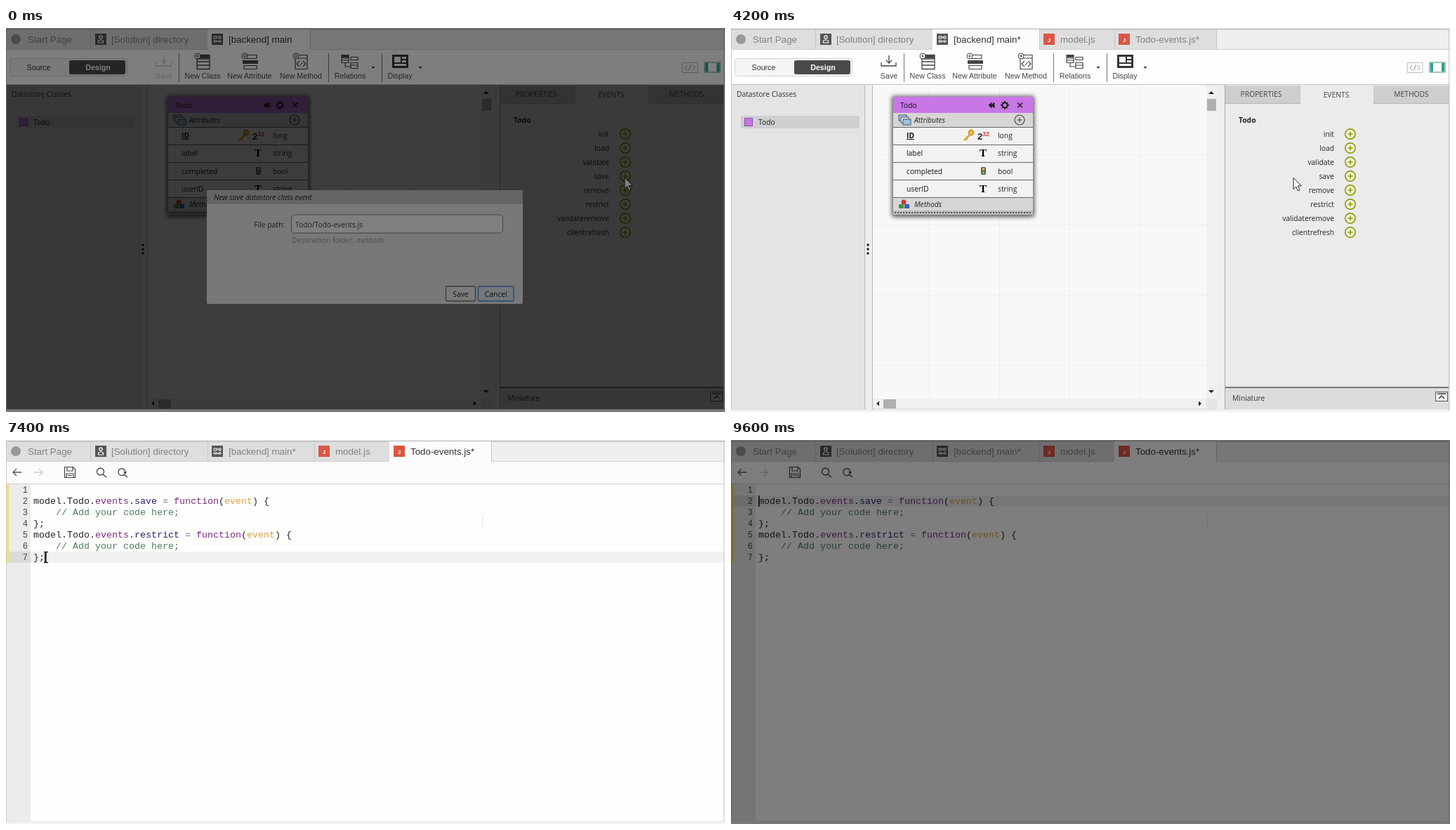
Animation of 1024 by 547 pixels, one loop 9.8 s. Source, as an HTML page:

```html
<!DOCTYPE html>
<html lang="en">
<head>
<meta charset="utf-8">
<title>Datastore class events</title>
<style>
html, body { margin: 0; width: 100%; height: 100%; overflow: hidden; background: #fff; }
svg { display: block; width: 100%; height: 100%; }
text { white-space: pre; }
.ui { font: 13.33px "Liberation Sans", Arial, sans-serif; }
.tool { font: 10.67px "Liberation Sans", Arial, sans-serif; }
.panel { font: 10.3px "Open Sans", "Noto Sans", sans-serif; }
.code { font: 13.33px "Liberation Mono", monospace; }
.italic { font-style: italic; }
.bold { font-weight: bold; }
</style>
</head>
<body>
<svg id="stage" viewBox="0 0 1024 547" preserveAspectRatio="none"></svg>
<script>
const LOOP = 9800, STEP = 200;
const stage = document.getElementById('stage');

const rect = (x, y, w, h, fill, extra = '') =>
  `<rect x="${x}" y="${y}" width="${w}" height="${h}" fill="${fill}" ${extra}/>`;
const path = (d, stroke = '#444', width = 1, fill = 'none', extra = '') =>
  `<path d="${d}" stroke="${stroke}" stroke-width="${width}" fill="${fill}" ${extra}/>`;
const text = (cls, x, y, str, fill = '#333', extra = '') =>
  `<text class="${cls}" x="${x}" y="${y}" fill="${fill}" ${extra}>${str}</text>`;
const circle = (x, y, r, fill, stroke = 'none', width = 1) =>
  `<circle cx="${x}" cy="${y}" r="${r}" fill="${fill}" stroke="${stroke}" stroke-width="${width}"/>`;
const group = (body, extra = '') => `<g ${extra}>${body}</g>`;
const plus = (x, y, r, color, fill = 'none', width = 1.5) =>
  circle(x, y, r, fill, color, width) +
  path(`M${x - r / 2} ${y}h${r}M${x} ${y - r / 2}v${r}`, color, width);

const MIDDLE = 'text-anchor="middle"', END = 'text-anchor="end"';
const PURPLE = '#c878e6';

// Timeline: [time, x, y, shape], eased from one row to the next
const CURSOR = [
  [0, 881, 213, 'arrow'], [600, 881, 213, 'arrow'], [1200, 651, 378, 'hand'],
  [1600, 655, 377, 'arrow'], [1800, 655, 377, 'beam'], [2100, 655, 377, 'beam'],
  [3100, 353, 16, 'arrow'], [3600, 353, 16, 'arrow'], [4400, 884, 250, 'arrow'],
  [5200, 884, 250, 'arrow'], [5800, 645, 377, 'hand'], [6000, 645, 377, 'arrow'],
  [6200, 645, 377, 'beam'], [6600, 645, 377, 'beam'], [7200, 57, 167, 'beam'],
  [7400, 57, 167, 'beam'], [7800, 40, 87, 'beam'], [8200, 281, 154, 'arrow'],
];
const SCENES = [
  { from: 0, view: 'design', dialog: 'save', tabs: 3, fade: .5 },
  { from: 200, view: 'design', dialog: 'save', tabs: 3 },
  { from: 1400, view: 'design', dialog: 'save', tabs: 3, idle: true },
  { from: 1600, view: 'design', tabs: 3, idle: true },
  { from: 1800, view: 'editor', lines: 4, line: 4 },
  { from: 3200, view: 'design' },
  { from: 4800, view: 'design', dialog: 'restrict' },
  { from: 6000, view: 'design' },
  { from: 6200, view: 'editor', lines: 4, line: 4, gutter: 491 },
  { from: 6400, view: 'editor', lines: 7, line: 7 },
  { from: 7600, view: 'editor', lines: 7, line: 5, selected: true },
  { from: 7800, view: 'editor', lines: 7, line: 2, selected: true },
  { from: 9400, view: 'editor', lines: 7, line: 2, noCursor: true },
  { from: 9600, view: 'editor', lines: 7, line: 2, noCursor: true, fade: .5 },
];

function tabBar(scene) {
  const design = scene.view === 'design', short = scene.tabs === 3;
  const edges = short ? [0, 120, 287, 433] : [0, 120, 287, 439, 546, 691];
  const active = design ? 2 : 4;
  const last = edges[edges.length - 1];
  let out = rect(0, 0, 1024, 31, '#efefef') + rect(0, 2, last, 28, '#dedede') +
    rect(0, 1, 1024, 1.5, '#bcbcbc') + rect(0, 30, 1024, 1, '#cfcfcf');
  edges.slice(1).forEach(x => out += rect(x, 3, 1, 27, '#c6c6c6'));
  out += rect(edges[active], 2, edges[active + 1] - edges[active], 29, '#fcfcfc');
  const label = (i, x, str) => text('ui', x, 21, str, i === active ? '#333' : '#808080');
  out += circle(14, 16, 7, '#999') + label(0, 31, 'Start Page');
  out += rect(127, 8, 16, 16, '#555') + circle(135, 13, 2.2, 'none', '#fff', 1.2) +
    path('M131.5 21v-2q0-2 3.5-2t3.5 2v2z', '#fff', 1.2) + label(1, 150, '[Solution] directory');
  out += rect(293, 8, 16, 16, '#555') +
    path('M296 12h4v3h-4zM296 18h4v2h-4zM303 12h3v3h-3zM303 18h3v2h-3zM300 13h3M300 19h3', '#fff') +
    label(2, 317, short ? '[backend] main' : '[backend] main*');
  if (short) return out;
  [[445, 469, 'model.js'], [552, 576, 'Todo-events.js*']].forEach(([x, tx, str], i) => {
    out += rect(x, 8, 16, 16, '#dc5545') +
      text('tool bold', x + 8, 19.5, 'J', '#fff', MIDDLE + ' style="font-size:8px"') + label(3 + i, tx, str);
  });
  return out;
}

function designToolbar(scene) {
  const dim = off => off ? 'opacity=".28"' : '';
  const badge = x => plus(x - 7, 40, 4, '#444', '#fff', 1);
  const item = (x, str, icon, off) =>
    group(icon + text('tool', x, 72, str, '#444', MIDDLE), dim(off));
  const saveOff = scene.tabs === 3, itemOff = scene.idle;
  let out = rect(0, 31, 1024, 50, '#fefefe');
  out += rect(5.5, 43.5, 167, 25, '#f5f5f5', 'rx="3" stroke="#d5d5d5"') +
    rect(90, 46, 80, 20, '#4a4a4a', 'rx="3"') +
    text('tool', 46.5, 60, 'Source', '#333', MIDDLE) + text('tool bold', 131, 60, 'Design', '#fff', MIDDLE);
  [246, 459, 535].forEach(x => out += rect(x, 36, 1, 41, '#777'));
  out += item(225, 'Save', path('M214 49v5h21v-5M225 39v10M221 46l4 4 4-4', '#444', 1.3), saveOff);
  out += item(280, 'New Class', path('M272 38.5h18v20h-18zM272 44h18M272 48h18M272 53h18', '#444', 1.3) +
    rect(272, 38, 18, 5, '#444') + badge(280));
  out += item(347, 'New Attribute', path('M339 38.5h18v5h-18zM339 53.5h18v5h-18z', '#444', 1.2) +
    rect(337, 46, 22, 5, '#444') + badge(347), itemOff);
  out += item(420, 'New Method', path('M412 38.5h17v20h-17zM412 43h17M418 47l-4 4 4 4M423 47l4 4-4 4M422 49l-3 4', '#444', 1.2) +
    badge(420), itemOff);
  out += item(490, 'Relations', path('M478 38.5h10v11h-10zM478 43h10M478 46h10M491 41.5h10v4h-10zM491 49.5h10v8h-10zM491 53h10M483 50v5h8', '#444', 1.2) +
    rect(478, 38, 10, 4, '#444'));
  out += item(561, 'Display', rect(550, 38, 23, 19, '#333') +
    rect(553, 41, 9, 8, '#fff') + rect(564, 41, 6, 3, '#fff') + rect(564, 46, 6, 3, '#fff') + rect(553, 51, 17, 3, '#fff'));
  [523, 590].forEach(x => out += path(`M${x - 2.5} 55h5l-2.5 3z`, 'none', 0, '#333'));
  out += path('M963 49.5h22v14h-22z', '#bbb') + path('M970 53l-3 3.5 3 3.5M978 53l3 3.5-3 3.5M975.5 52l-3 9', '#888') +
    rect(995, 49, 22, 14, '#fff', 'stroke="#3f8f7d"') + rect(996, 50, 4, 12, '#2fa58a') + rect(1012, 50, 4, 12, '#2fa58a');
  return out + rect(0, 80, 1024, 1, '#c4c4c4');
}

function classBox() {
  let out = rect(229, 97, 203, 172, '#000', 'opacity=".65" filter="url(#blur)" rx="3"') +
    rect(231, 98, 199, 168, '#f2f2f2') + rect(231, 98, 199, 23, PURPLE) + rect(231, 121, 199, 20, '#d6d6d6') +
    rect(231, 241, 199, 19, '#d6d6d6') + rect(231, 260, 199, 6, '#bbb');
  out += path('M233 263h195', '#555', 2, 'none', 'stroke-dasharray="2 2"');
  [141, 166, 191, 216, 241].forEach(y => out += rect(231, y, 199, 1, '#666'));
  out += text('panel', 241, 114, 'Todo', '#111') + path('M371 106l-4 4 4 4zM375 106l-4 4 4 4z', '#222', 1, '#222') +
    circle(390, 110, 3.5, 'none', '#222', 2) +
    path('M390 104v2M390 114v2M384 110h2M394 110h2M386 106l1 1M393 113l1 1M386 114l1-1M393 107l1-1', '#222', 2) +
    path('M408 106.5l7 7M415 106.5l-7 7', '#222', 1.6);
  out += rect(239, 124, 11, 8, '#a9c7dc', 'stroke="#456"') + rect(242, 127, 11, 8, '#d8e8f2', 'stroke="#456"') +
    rect(245, 130, 11, 8, '#9fc4df', 'stroke="#456"') +
    text('panel italic', 261, 134.5, 'Attributes', '#222') + plus(411, 131, 7, '#444', 'none', 1.2);
  [['ID', 'long'], ['label', 'string'], ['completed', 'bool'], ['userID', 'string']].forEach(([name, type], i) => {
    const y = 157 + i * 25.3;
    out += text(i ? 'panel' : 'panel bold', 250, y, name, '#111', i ? '' : 'text-decoration="underline"') +
      text('panel', 380, y, type, '#222');
    if (i % 2) out += `<text x="359" y="${y + 1}" text-anchor="middle" font-family="Liberation Serif, serif" font-size="15" font-weight="bold">T</text>`;
  });
  out += path('M340 152l-8 8M335 157l2 2', '#e0a52a', 2.5) + circle(342, 149, 3.5, '#f0c550', '#c9932a', 1.8) +
    text('tool bold', 351, 159, '2', '#222', 'style="font-size:13px"') +
    text('tool bold', 358, 154, '32', '#d0453a', 'style="font-size:9px"');
  out += rect(356, 198, 7, 11, '#555', 'rx="2"') + circle(359.5, 201, 2, '#e2b44a') + circle(359.5, 206, 2, '#7ec04a');
  out += circle(246, 248, 3.5, '#c23d35') + rect(239, 251, 7, 6, '#42953f') + rect(247, 251, 7, 6, '#3d62a8') +
    text('panel italic', 261, 255, 'Methods', '#222');
  return out;
}

function designBody() {
  let out = rect(0, 81, 1024, 462, '#e4e4e4') + rect(190, 81, 11, 462, '#eee') + rect(201, 81, 476, 447, '#f8f8f8') +
    rect(190, 81, 1, 462, '#bbb') + rect(201, 81, 1, 462, '#bbb');
  [180, 280, 380, 480].forEach(y => out += rect(202, y, 474, 1, '#eee'));
  [282, 382, 482, 582].forEach(x => out += rect(x, 82, 1, 446, '#eee'));
  out += text('panel', 8, 98, 'Datastore Classes') + rect(14, 125, 169, 18, '#cfcfcf') +
    rect(19.5, 128.5, 11, 11, PURPLE, 'stroke="#8d4ba8"') + text('panel', 39, 138, 'Todo', '#222');
  [309, 315, 321].forEach(y => out += circle(195, y, 1.8, '#222'));
  out += rect(677, 82, 15, 446, '#f0f0f0') + rect(202, 528, 475, 14, '#f0f0f0') +
    rect(678, 101, 13, 17, '#b0b0b0') + rect(217, 529, 18, 13, '#b0b0b0') +
    path('M680 94h8l-4-4zM680 516h8l-4 4zM211 531.5v7l-4-3.5zM666 531.5v7l4-3.5z', 'none', 0, '#222');
  out += rect(692, 81, 12, 462, '#eee') + rect(703, 81, 1, 462, '#aaa') + rect(704, 81, 319, 462, '#ebebeb') +
    rect(704, 82, 107, 26, '#cecece') + rect(915, 82, 108, 26, '#cecece') + rect(704, 107, 107, 1, '#b5b5b5') + rect(915, 107, 108, 1, '#b5b5b5');
  [[755, 98, 'PROPERTIES'], [862, 99, 'EVENTS'], [969, 98, 'METHODS']].forEach(([x, y, str]) =>
    out += text('panel', x, y, str, '#444', MIDDLE));
  out += text('panel bold', 723, 135, 'Todo', '#222');
  ['init', 'load', 'validate', 'save', 'remove', 'restrict', 'validateremove', 'clientrefresh'].forEach((name, i) =>
    out += text('panel', 859, 154.5 + i * 20, name, '#222', END) + plus(882, 151 + i * 20, 7.2, '#8d9c12', '#f3f5da', 1.7));
  out += rect(704, 511, 319, 2, '#777') + rect(704, 513, 319, 30, '#dcdcdc') + text('panel', 714, 531, 'Miniature') +
    rect(1003.5, 518.5, 17, 13, '#eee', 'stroke="#555"') + path('M1006 521h12M1008 528l4-4 4 4', '#333', 1.3);
  return out + classBox();
}

function dialog(event, hot) {
  const button = (x, w, str, stroke, fill) =>
    rect(x + .5, 368, w, 21, fill, `rx="2" stroke="${stroke}" stroke-width="1.3"`) +
    text('panel', x + w / 2 + .5, 382.5, str, '#222', MIDDLE);
  return rect(0, 81, 1023, 462, '#000', 'opacity=".5"') +
    rect(286, 231, 450, 162, '#f1f1f3', 'rx="2"') + rect(286, 231, 450, 20, '#cacaca', 'rx="2"') +
    text('panel italic', 296, 245, `New ${event} datastore class event`, '#222') +
    text('panel', 397, 283.5, 'File path:', '#333', END) +
    rect(406.5, 266, 301, 26, '#fff', 'rx="5" stroke="#888"') + text('panel', 412, 283.5, 'Todo/Todo-events.js', '#444') +
    text('panel', 407, 306, 'Destination folder: <tspan class="italic">methods</tspan>', '#999') +
    button(626, 42, 'Save', hot ? '#5b8fb8' : '#777', hot ? '#e3eef7' : '#f5f5f5') +
    button(672, 50.5, 'Cancel', '#4a8fd8', '#e6f0f9');
}

const span = (str, fill) => `<tspan fill="${fill}">${str}</tspan>`;
const opening = name => 'model.Todo.' + span('events', '#7b2a80') + '.' + span(name, '#22226e') + ' ' +
  span('=', '#687687') + ' ' + span('function', '#7b2a80') + '(' + span('event', '#e2a045') + ') {';
const comment = '    ' + span('// Add your code here;', '#4b7f5c');
const CODE = ['', opening('save'), comment, '};', opening('restrict'), comment, '};'];

function editor({ lines, line, selected, gutter = 543 }) {
  const top = n => 63 + (n - 1) * 16;
  let out = rect(0, 31, 1024, 32, '#fbfbfc') + rect(0, 62, 1024, 1, '#d2d2d2') +
    rect(0, 63, 1024, 481, '#fefefd') + rect(0, 63, 35, gutter - 63, '#ececec');
  out += path('M22 46H10M15 41l-5 5 5 5', '#555', 1.3) + path('M40 46h12M47 41l5 5-5 5', '#ccc', 1.3) +
    path('M83.5 38.5h12l3 3v12h-15zM87 39v5h8v-5M86 54v-6h10v6M88 50.5h6', '#444', 1.2) +
    circle(134.5, 45, 5, 'none', '#444', 1.3) + path('M138 49l5 4', '#444', 1.5) +
    path('M169 48.5a5 5 0 1 1 .8-4M168 49l5 4', '#444', 1.3) + path('M167 45h5l-2 4z', 'none', 0, '#444');
  out += rect(0, top(line), 35, 16, '#dadada');
  out += selected
    ? rect(39, top(line), 984, (lines - line) * 16, '#b5d5ff') + rect(39, top(lines), 16, 16, '#b5d5ff')
    : rect(35, top(line), 988, 16, '#f0f0f3');
  out += rect(1, 63, 3, lines * 16, '#f4e36a') + rect(678, 107, 1, 20, '#e6e6e6');
  CODE.slice(0, lines).forEach((str, i) => out +=
    text('code', 31, top(i + 1) + 12, i + 1, '#444', END + ' style="font-size:12px"') +
    text('code', 39, top(i + 1) + 12, str, '#222', 'xml:space="preserve"'));
  return out + rect(line === lines ? 55 : 39, top(line), 1.6, 16, '#111');
}

const SHAPES = {
  arrow: path('M0 0v16l3.7-3.5 2.7 6 2.6-1.2-2.7-5.8h5z', '#222', 1, '#fff'),
  hand: path('M-2.500 2q2-2.500 4 0v7l8 2q2.500.7 2.300 3.500l-1.800 9h-9.500l-6-8q-1.500-3 1.200-2.500l1.800 2z', '#222', 1.300, '#fff') +
    path('M4.500 10v3.500M8 11v3', '#222'),
  beam: path('M-3-7.5h2l1 1 1-1h2M-3 7.5h2l1-1 1 1h2M0-7v14', '#222', 1.4),
};

function cursorAt(t) {
  const i = CURSOR.findLastIndex(k => k[0] <= t);
  const [t0, x0, y0, shape] = CURSOR[i], [t1, x1, y1] = CURSOR[i + 1] || [LOOP, x0, y0];
  const u = (t - t0) / (t1 - t0), e = u * u * (3 - 2 * u);
  return { x: x0 + (x1 - x0) * e, y: y0 + (y1 - y0) * e, shape };
}

function draw(t) {
  const scene = SCENES.findLast(s => s.from <= t), cursor = cursorAt(t);
  let out = '<defs><filter id="blur" x="-10%" y="-10%" width="120%" height="120%"><feGaussianBlur stdDeviation="3"/></filter></defs>' +
    rect(0, 0, 1024, 547, '#fff') + tabBar(scene);
  if (scene.view === 'design') {
    out += designToolbar(scene) + designBody();
    if (scene.dialog) out += dialog(scene.dialog, cursor.shape === 'hand');
  } else out += editor(scene);
  out += path('M.5 2v542h1022v-542', '#c8c8c8') + rect(0, 544, 1024, 3, '#f3f3f3');
  if (!scene.noCursor) out += group(SHAPES[cursor.shape], `transform="translate(${cursor.x} ${cursor.y})"`);
  if (scene.fade) out += rect(0, 0, 1024, 547, '#000', `opacity="${scene.fade}"`);
  return out;
}

let shown = -1;
function tick() {
  const t = Math.floor(performance.now() % LOOP / STEP) * STEP;
  if (t !== shown) stage.innerHTML = draw(shown = t);
  requestAnimationFrame(tick);
}
tick();
</script>
</body>
</html>
```
